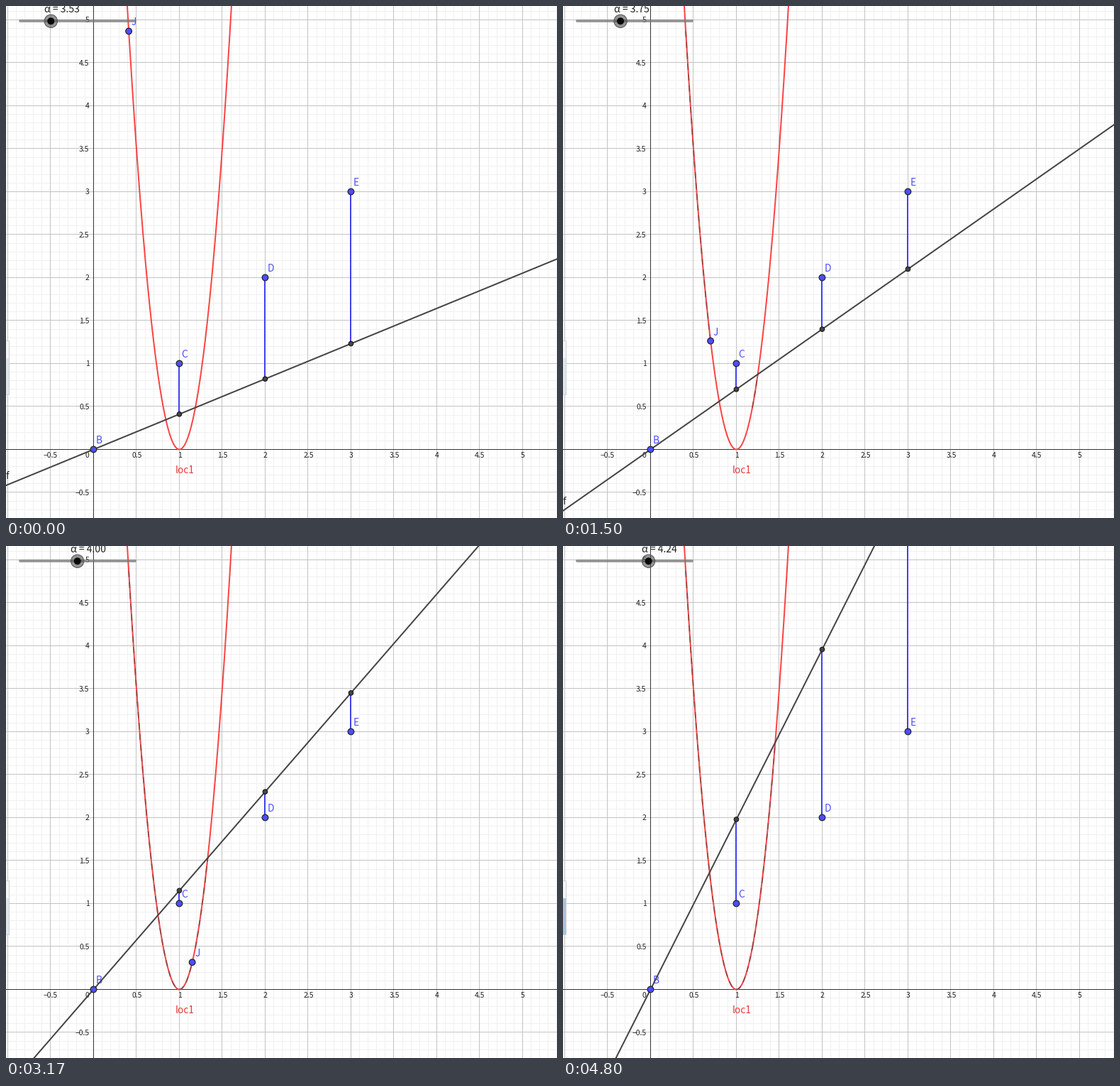
Write a matplotlib script that moves like this. It is 777x721 px and loops after 4.93 s.

```python
import numpy as np
import matplotlib.pyplot as plt
from matplotlib.animation import FuncAnimation
from matplotlib.patches import Circle, Rectangle

W, H = 777, 721
OX, OY, UNIT = 123.45, 624.45, 121.0
FRAMES, STEP = 170, 29
BLUE, DARK, RED = "#4d4dff", "#444444", "#fb4444"

# start time of each slider tick; a few ticks are held longer
TICKS = np.interp(
    np.arange(64),
    [0, 1, 10, 11, 20, 21, 27, 28, 34, 35, 36, 39, 40, 42, 43, 55, 56, 63],
    [0, 140, 750, 880, 1500, 1630, 2040, 2170, 2580, 2710, 2770, 2980,
     3110, 3240, 3370, 4190, 4320, 4800])
# slider value at each tick
ALPHAS = np.interp(
    np.arange(64),
    [0, 11, 15, 20, 27, 36, 42, 47, 50, 57, 63],
    [3.5310, 3.6565, 3.703, 3.7521, 3.832, 3.9344, 4.0092, 4.0682,
     4.1014, 4.176, 4.2444])
PANEL_TICK = 60

plt.rcParams["font.family"] = ["Noto Sans CJK JP", "DejaVu Sans"]
fig = plt.figure(figsize=(W / 72, H / 72), dpi=72, facecolor="white")
ax = fig.add_axes([0, 0, 1, 1])
ax.set_xlim(0, W)
ax.set_ylim(H, 0)
ax.axis("off")


def px(x):
    return OX + UNIT * x


def py(y):
    return OY - UNIT * y


def error(m):
    """Sum of squared gaps between the points and the line of slope m."""
    return 14 * (m - 1) ** 2


def line(color, width, z, x=(), y=(), **kw):
    return ax.plot(x, y, color=color, lw=width, zorder=z, **kw)[0]


def dot(x, y, r, color, z):
    return ax.add_patch(Circle((x, y), r, fc=color, ec="#111111", lw=1, zorder=z))


def label(x, y, s, size, color, z=2, ha="left"):
    return ax.text(x, y, s, size=size, color=color, ha=ha, va="baseline", zorder=z)


def rules(xs, ys, color, z):
    """Full-length lines, each filling exactly one row or column of pixels."""
    path = []
    for x in np.floor(xs) + 0.5:
        path += [(x, 0), (x, H), (np.nan, np.nan)]
    for y in np.floor(ys) + 0.5:
        path += [(0, y), (W, y), (np.nan, np.nan)]
    line(color, 1, z, *np.transpose(path), snap=False)


def grid(gap, color, z):
    rules(np.arange(OX % gap, W, gap), np.arange(OY % gap, H, gap), color, z)


def set_arc(art, x0, x1):
    x = np.linspace(x0, max(x0, x1), 120)
    art.set_data(px(x), py(error(x)))


def crossing(m):
    """Right-hand meeting point of the line and the parabola."""
    b = 28 + m
    return (b + np.sqrt(b * b - 784)) / 28


# coordinate plane
grid(UNIT / 10, "#f0f0f0", 0)
grid(UNIT / 2, "#c3c3c3", 0.5)
rules([OX], [OY], "#333333", 1)
for k in range(-1, 11):
    if k == 0:
        label(114, 636, "0", 10.4, "#222222", ha="center")
        continue
    s = f"{k / 2:g}".replace("-", "\u2212")
    label(px(k / 2) + (0.5 if k > 0 else -0.5), 636, s, 10.4, "#222222", ha="center")
    label(117.5, py(k / 2) + 3.6, s, 10.4, "#222222", ha="right")

# clipped side panel
ax.add_patch(Rectangle((-3, 471), 7, 76, fc="#f4f4f4", ec="#d0d0d0", lw=1, zorder=3))
panel = ax.add_patch(Rectangle((-3, 496), 7, 51, lw=0, zorder=3.1))

# parabola, with a dark broken trace where things have passed over it
m = np.linspace(0.38, 1.62, 200)
line(RED, 2, 3, px(m), py(error(m)))
label(239, 658, "loc1", 13.8, "#ea3a3a", 3)
trace = [line("#55484a", 1.7, 3.2, alpha=0.65, ls=(0, (5, 4)), dash_capstyle="butt")
         for _ in range(2)]

# fixed points, their stems and the feet on the line
stems, feet = [], []
for n, name in enumerate("CDE", 1):
    stems.append(line("#4040ee", 2, 4, solid_capstyle="butt"))
    dot(px(n), py(n), 4.4, BLUE, 6)
    label(px(n) + 3, py(n) - 8, name, 13.8, BLUE, 3.5)
    feet.append(dot(px(n), 0, 3.3, DARK, 7))
dot(OX, OY, 4.4, BLUE, 6)
label(OX + 3, OY - 8, "B", 13.8, BLUE, 3.5)

fit = line(DARK, 2, 5)
fit_name = label(0, 0, "f", 13.8, "#222222", 5)
tip = dot(0, 0, 4.4, BLUE, 7)
tip_name = label(0, 0, "J", 13.8, BLUE, 7)

# slider
SLIDER_Y = 21.3
line("#777777", 4, 8, [20, 181.5], [SLIDER_Y] * 2, alpha=0.75, solid_capstyle="round")
knob = ax.add_patch(Circle((0, SLIDER_Y), 9.2, fc=(0.3, 0.3, 0.3, 0.6), ec="#555555",
                           lw=1, zorder=9))
core = ax.add_patch(Circle((0, SLIDER_Y), 5, fc="#080808", lw=0, zorder=9.1))
value = label(0, 9, "", 14, "#222222", 9)

M0 = np.tan(ALPHAS[0])


def draw(i):
    # sample late in the interval so that ticks are not shown behind time
    tick = np.searchsorted(TICKS, i * STEP + 22, side="right") - 1
    alpha = ALPHAS[tick]
    m = np.tan(alpha)

    fit.set_data([-20, W + 20], [OY + m * (OX + 20), OY - m * (W + 20 - OX)])
    y_left = OY + m * OX
    fit_name.set_position((0, y_left - 9))
    fit_name.set_visible(y_left < H + 20)

    for n, (stem, foot) in enumerate(zip(stems, feet), 1):
        stem.set_data([px(n)] * 2, [py(n), py(n * m)])
        foot.center = px(n), py(n * m)

    x, y = px(m), py(error(m))
    tip.center = x, y
    tip_name.set_position((x + 3.5, y - 8))
    tip_name.set_visible(y > -5)
    set_arc(trace[0], M0, min(m, crossing(M0)))
    set_arc(trace[1], crossing(M0), crossing(m))

    kx = 63.3 + 80.3 * (alpha - ALPHAS[0])
    knob.center = core.center = kx, SLIDER_Y
    value.set_position((kx - 9.5, 9))
    value.set_text(f"\u03b1 = {alpha:.2f}")
    panel.set_facecolor("#a9c3d8" if tick >= PANEL_TICK else "#dde6ed")
    return []


anim = FuncAnimation(fig, draw, frames=FRAMES, interval=STEP, repeat=True,
                     repeat_delay=0, blit=False)
plt.show()
```
